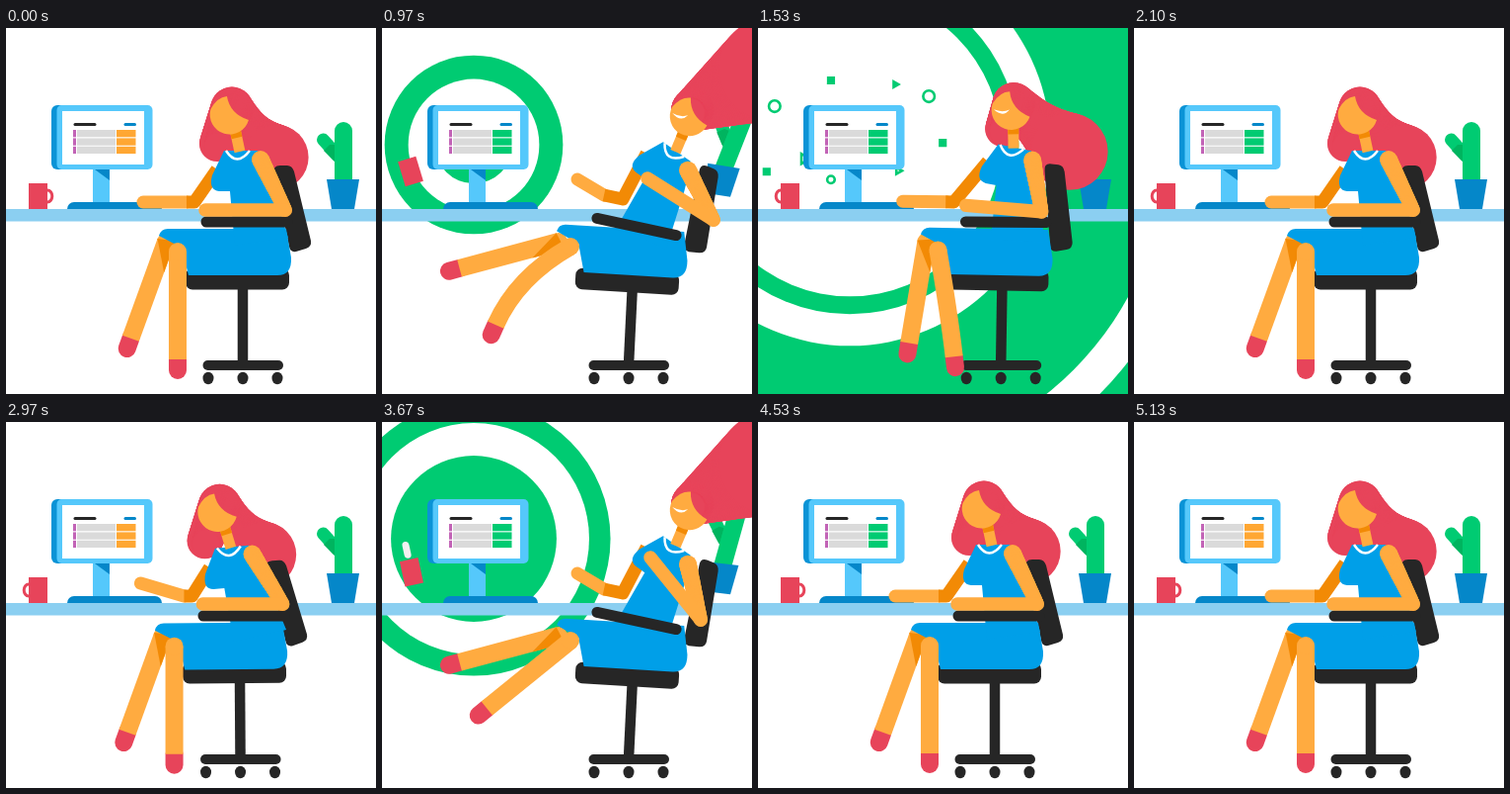
Write an HTML page with a canvas that moves like this. It is 375 px wide and 370 px high and loops after 5.16 s.

```html
<!DOCTYPE html>
<html>
<head>
<meta charset="utf-8">
<style>
html, body { margin: 0; width: 100%; height: 100%; overflow: hidden; background: #fff; }
canvas { display: block; }
</style>
</head>
<body>
<canvas id="stage" width="375" height="370"></canvas>
<script>
const g = document.getElementById('stage').getContext('2d');
const CYCLE = 2580;
const SKIN = '#ffab40', SHADE = '#f28a05', RED = '#e7445a', DRESS = '#009fe8', BLACK = '#262626', GREEN = '#00cb72',
  LEAF = '#00b45f', BLUE = '#0587c9', SKY = '#55c8fb', DESK = '#8bcff1', WHITE = '#fff', ORANGE = '#ffa733';

const clamp = v => Math.max(0, Math.min(1, v));
const ramp = (t, a, b) => { const u = clamp((t - a) / (b - a)); return u * u * (3 - 2 * u); };
const hold = (t, a, b, c, d) => ramp(t, a, b) - ramp(t, c, d);
const bump = (t, a, b) => Math.sin(Math.PI * clamp((t - a) / (b - a)));
const radians = degrees => degrees * Math.PI / 180;

function rect(x, y, w, h, color, r = 0) {
  g.fillStyle = color;
  g.beginPath();
  g.roundRect(x, y, w, h, r);
  g.fill();
}
function disc(x, y, rx, color, ry = rx) {
  if (rx <= 0) return;
  g.fillStyle = color;
  g.beginPath();
  g.ellipse(x, y, rx, ry, 0, 0, 7);
  g.fill();
}
function shape(d, color) {
  g.fillStyle = color;
  g.fill(new Path2D(d));
}
function line(p, width, color, cap = 'round') {
  g.strokeStyle = color;
  g.lineWidth = width;
  g.lineCap = cap;
  g.lineJoin = 'round';
  g.beginPath();
  for (let i = 0; i < p.length; i += 2) g.lineTo(p[i], p[i + 1]);
  g.stroke();
}
// A limb or lock of hair whose radius runs from r0 to r1, narrower in the middle by pinch.
function taper(x0, y0, r0, x1, y1, r1, color, pinch = 0) {
  for (let i = 0; i <= 40; i++) {
    const u = i / 40;
    disc(x0 + (x1 - x0) * u, y0 + (y1 - y0) * u, r0 + (r1 - r0) * u - pinch * Math.sin(Math.PI * u), color);
  }
}
// Draws in stage coordinates, turned about the point x, y.
function turned(x, y, degrees, draw) {
  g.save();
  g.translate(x, y);
  g.rotate(radians(degrees));
  g.translate(-x, -y);
  draw();
  g.restore();
}

function burst(t) {
  const x = t - 970;
  if (x < -280) return;
  const r = 39 + .335 * x + .0003 * x * x;
  [r + 51 + Math.min(.03 * x, 6), r + 27 + Math.min(.05 * x, 9), r, r - 118, r - 150, r - 168]
    .forEach((v, i) => disc(93, 118, v, i % 2 ? WHITE : GREEN));
}

// Each piece flies from the screen's centre through one key point, then falls.
const PIECES = [[74, 53], [139, 57], [17, 79], [187, 116], [47, 132], [173, 69], [9, 145], [142, 144], [74, 153]];
function confetti(t) {
  const u = (t - 1530) / 60;
  if (u < -7 || u > 7) return;
  PIECES.forEach(([px, py], i) => {
    const sides = [4, 3, 0][i % 3];
    const size = (i < 7 ? 5.8 : 3.8) * clamp(Math.min((u + 7) / 2, (7 - u) / 5));
    const x = px + (px - 93) * u / 7, y = py + (py - 37) * u / 7 + 1.44 * u * (u - 1);
    turned(x, y, (i % 2 ? 14 : 4) * u, () => {
      g.beginPath();
      if (!sides) g.arc(x, y, size, 0, 7);
      for (let k = 0; k < sides; k++) {
        const a = (k + (sides === 4 ? .5 : 0)) * 2 * Math.PI / sides;
        g.lineTo(x + size * Math.cos(a), y + size * Math.sin(a));
      }
      g.closePath();
      g.fillStyle = g.strokeStyle = GREEN;
      g.lineWidth = 2.6;
      if (sides === 4 || i < 2) g.fill(); else g.stroke();
    });
  });
}

function plant(hop) {
  g.save();
  g.translate(.1 * hop, -.55 * hop);
  turned(341.5, 168, .36 * hop, () => {
    turned(341.5, 155, .5 * hop, () => {
      line([321.5, 113, 336, 129], 13, GREEN);
      shape('M333 118V135L322 124L328 118Z', LEAF);
      rect(333, 95, 18, 62, GREEN, [9, 9, 0, 0]);
    });
    shape('M325 153H358L353 183H330Z', BLUE);
  });
  g.restore();
}

function page(y, ends) {
  line([70, y + 97.5, 90, y + 97.5], 3, BLACK);
  line([121, y + 97.5, 130.5, y + 97.5], 3, BLUE);
  ends.forEach((color, i) => {
    const top = y + 103 + 8.4 * i;
    rect(68, top, 3, 7.3, '#c263b6');
    rect(72, top, 39, 7.3, '#dadada');
    rect(112, top, 19.5, 7.3, color);
  });
}
function monitor(t) {
  rect(88, 140, 17, 38, SKY);
  shape('M90 143H105V154Z', BLUE);
  rect(62, 176, 96, 7, BLUE, [7, 7, 0, 0]);
  rect(46, 78, 30, 65, '#0a93d6', 6);
  rect(51.5, 78, 97, 65, SKY, 5);
  rect(57, 84, 83, 54, WHITE);
  g.save();
  g.beginPath();
  g.rect(57, 84, 83, 54);
  g.clip();
  const scroll = ramp(t, 2200, 2550);
  page(-54 * scroll, [640, 680, 720].map(start => t > start ? GREEN : ORANGE));
  page(54 * (1 - scroll), [ORANGE, ORANGE, ORANGE]);
  g.restore();
}

function mug(t, hop, halfTurns) {
  const c = Math.cos(Math.PI * (clamp((t - 720) / 730) + halfTurns));
  g.save();
  g.translate(-.14 * hop, -hop);
  turned(32.5, 170, -.68 * hop, () => {
    if (t > 990 && t < 1190) {
      const y = 170 - 23 * bump(t, 990, 1190);
      line([32.5, y - 5, 32.5, y + 5], 7, '#f3f0f1');
    }
    g.strokeStyle = RED;
    g.lineWidth = 3;
    g.beginPath();
    g.ellipse(32.5 + 9.5 * c, 170, 4.8 * Math.abs(c), 6, 0, 0, 7);
    g.stroke();
    rect(23, 157, 19, 26, RED);
  });
  g.restore();
}

// Angle is measured from straight down towards the desk.
function leg(kx, ky, length, degrees, bend, shaded) {
  const ux = -Math.sin(radians(degrees)), uy = Math.cos(radians(degrees));
  const fx = kx + length * ux, fy = ky + length * uy;
  const cx = (kx + fx) / 2 - bend, cy = (ky + fy) / 2 - bend;
  const d = Math.hypot(fx - cx, fy - cy), ax = fx - 11 * (fx - cx) / d, ay = fy - 11 * (fy - cy) / d;
  line([ax, ay, fx, fy], 18, RED);
  g.strokeStyle = SKIN;
  g.lineCap = 'butt';
  g.beginPath();
  g.moveTo(kx, ky);
  g.quadraticCurveTo(cx, cy, ax, ay);
  g.stroke();
  disc(kx, ky, 9, SKIN);
  if (!shaded) return;
  const at = (along, side) => `${kx + along * ux + side * uy} ${ky + along * uy - side * ux}`;
  shape(`M${at(0, -9)}L${at(-4, 9)}L${at(30, 9)}Z`, SHADE);
}

function hair(x, y, t) {
  const lift = hold(t, 640, 830, 1330, 1650), swing = Math.sqrt(bump(t, 1545, 1950));
  const angle = radians(45 - 74 * lift * lift), reach = 66 + 26 * lift - 38 * swing;
  taper(x + 2, y - 3, 21.5, x + reach * Math.cos(angle), y + reach * Math.sin(angle),
    33 + 19 * lift - 24 * swing, RED, 7 * (1 - lift));
  const loose = 1 - lift;
  taper(x + 2, y - 3, 21.5, x - (13 + 20 * swing) * loose, y + (33 - 7 * swing) * loose, 18, RED);
  taper(x, y, 18, x - 12 * loose, y + (36 + 60 * swing) * loose, 14, RED);
}

function woman(t) {
  const typing = bump(t, 0, 700);
  const lean = hold(t, 640, 830, 1300, 1670) - .14 * typing;
  const reach = lean ** 3;
  const kick = lean > .05 ? lean * Math.sin(Math.PI * (t - 970) / 240) ** 2 : 0;
  const swing = hold(t, 640, 830, 1280, 1500) - .2 * bump(t, 1350, 1800);
  const hip = [262, 205], tilt = 35 * lean;
  const follow = (x, y) => {
    const c = Math.cos(radians(tilt)), s = Math.sin(radians(tilt)), dx = x - hip[0], dy = y - hip[1];
    return [hip[0] + dx * c - dy * s, hip[1] + dx * s + dy * c];
  };

  g.save();
  g.translate(10 * hold(t, 640, 830, 1300, 1850) - 2.5 * typing, 0);
  hair(...follow(227, 84), t);

  turned(297, 243, 23 * lean, () => shape(
    'M278 139H285Q290 139 292 145L309 215Q310 221 304 223L294 226Q288 227 287 221L272 147Q270 139 278 139Z', BLACK));
  line([240 + 4 * lean, 258, 240, 340], 10.5, BLACK, 'butt');
  rect(199.5, 336, 81.5, 10, BLACK, 5);
  for (const x of [205, 240, 275]) disc(x, 354, 5.5, BLACK, 6.2);
  g.save();
  g.translate(4 * lean, 2.5 * lean);
  turned(235, 253, 3.5 * lean, () => rect(182, 243, 105, 21.5, BLACK, 7));
  g.restore();

  const hand = 176 - 23 * reach - (t > 40 && t < 600 ? 13 * Math.sin(Math.PI * (t - 40) / 140) ** 2 : 0);
  const elbow = [191 + 43 * reach, 176 - 3 * reach], wrist = [183 + 32 * reach, 176 - 7 * reach];
  line([...wrist, 139 + 49 * reach, hand], 13, SKIN);
  line([...follow(214, 143), ...elbow, ...wrist], 13, SHADE, 'butt');

  leg(162 + 7 * lean, 216, 115, 20 + 55 * swing, 0, true);
  g.save();
  g.translate(11 * lean, 0);
  turned(235, 225, 3.5 * lean, () => shape(
    'M155 210Q157 203 164 203H284L289 232Q290 250 275 250H185L178 222Z', DRESS));
  g.restore();
  leg(174 + 7 * lean, 226 - 5 * lean, 120, swing * (42 + 9 * kick), 14 * swing * (1 - kick), false);

  turned(...hip, tilt, () => {
    shape('M221 124H255Q262 138 267 152L286 212L232 220L227 165H216Q205 164 209 149Z', DRESS);
    line([231, 97, 237, 125], 11, SKIN, 'butt');
    line([231, 97, 234, 111], 11, SHADE, 'butt');
    g.strokeStyle = WHITE;
    g.lineWidth = 2.5;
    g.stroke(new Path2D('M223 124Q234 141 247 124'));
    turned(227, 84, -23 * lean, () => {
      shape('M207.5 82Q214 70 224 69Q227 87 246 93A19.7 19.7 0 0 1 207.5 82Z', SKIN);
      if (t > 700 && t < 1560) shape('M209 88Q218 91 225 87Q219 96 209 88Z', WHITE);
    });
  });

  g.save();
  g.translate(4 * lean, 5 * reach);
  turned(244, 196, 12 * reach, () => line([203, 196, 285, 196], 11, BLACK));
  g.restore();
  const joint = [283 + 43 * reach - 13 * kick, 184 + 10 * reach + 6 * kick];
  taper(...follow(258, 133), 9, ...joint, 7, SKIN);
  line([...joint, 202 + 57 * reach + 3 * kick, 184 - 32 * reach - 15 * kick], 13.5, SKIN);
  g.restore();
}

function draw(now) {
  const t = now % CYCLE, halfTurns = Math.floor(now / CYCLE) % 2;
  const hop = Math.max(0, 25.5 * (1 - ((t - 930) / 300) ** 2));
  rect(0, 0, 375, 370, WHITE);
  burst(t);
  confetti(t);
  rect(0, 183, 375, 12.5, DESK);
  plant(hop);
  monitor(t);
  mug(t, hop, halfTurns);
  woman(t);
}
const start = performance.now();
function tick() {
  draw(performance.now() - start);
  requestAnimationFrame(tick);
}
tick();
</script>
</body>
</html>
```
